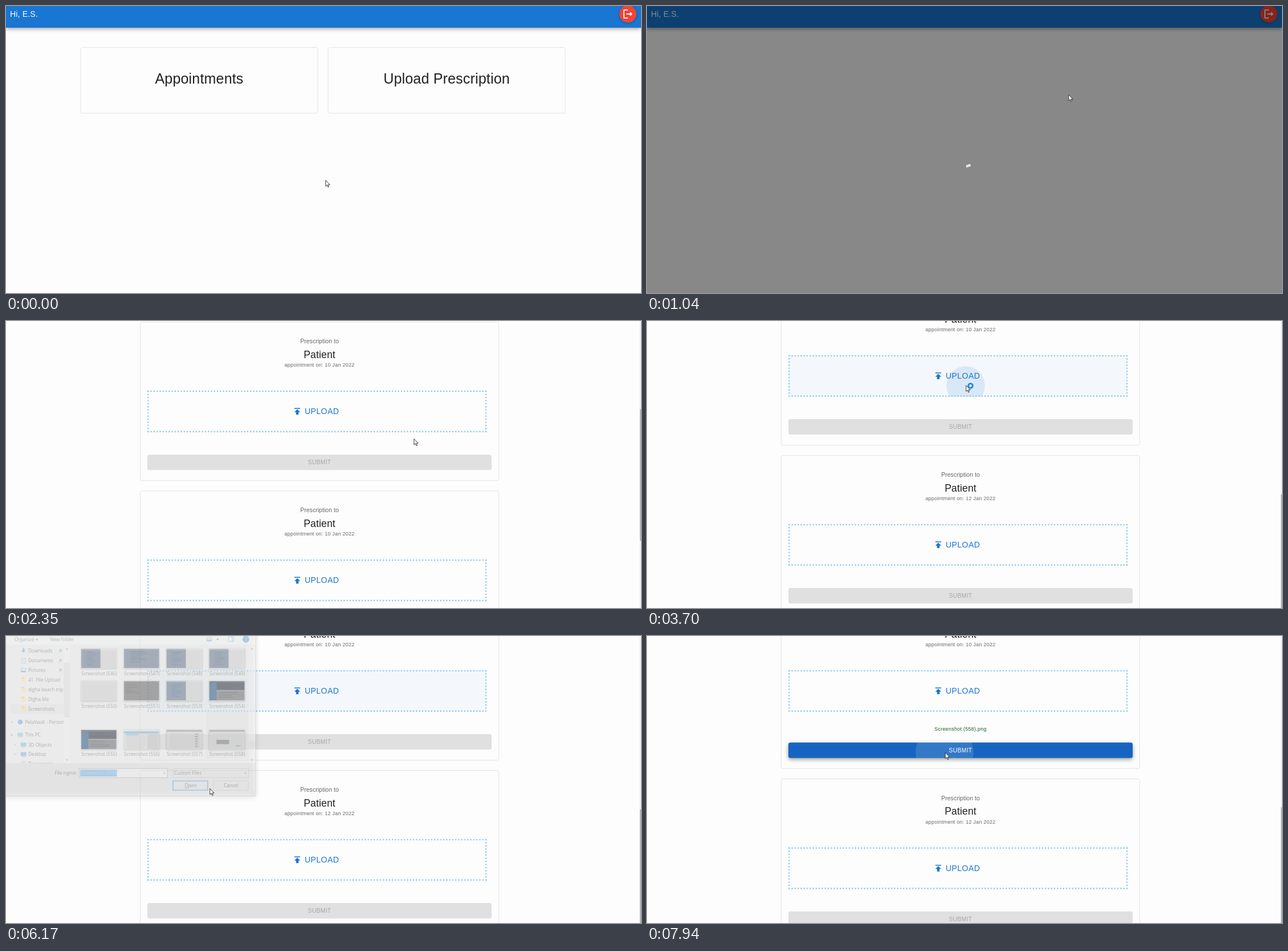
Recreate the animation shown at these times as an HTML page with a canvas. Size 1114 by 503 pixels, loop 8000 ms.

```html
<!DOCTYPE html>
<html lang="en">
<head>
<meta charset="utf-8">
<title>Prescription upload</title>
<style>
html, body { margin: 0; width: 100%; height: 100%; overflow: hidden; background: #fdfdfd; }
canvas { display: block; width: 1114px; height: 503px; }
</style>
</head>
<body>
<canvas id="stage" width="1114" height="503"></canvas>
<script>
const ctx = document.getElementById('stage').getContext('2d');
const W = 1114, H = 503, LOOP = 8000;
const WEB = '"Liberation Sans", Arial, sans-serif';
const UI = '"Open Sans", "Noto Sans", sans-serif';
const BLUE = '#1976d2', INK = '#212121', NAVY = '#0b2a55';
const LOGOUT = new Path2D('M17 8l-1.41 1.41L17.17 11H9v2h8.17l-1.58 1.58L17 16l4-4-4-4zM5 5h7V3H5c-1.1 0-2 .9-2 2v14c0 1.1.9 2 2 2h7v-2H5V5z');
const UPLOAD = new Path2D('M5 4v2h14V4H5zm0 10h4v6h6v-6h4l-7-7-7 7z');
const ARROW = new Path2D('M0 0V10.4L2.4 8.2L4.1 12L5.7 11.3L4.1 7.6H7.4Z');

// Scene times in ms
const LOAD = 890, LOADED = 1400, PRESS = 3600, RELEASE = 3700, DIALOG = 4870,
  PICK = 5080, CLOSE = 6060, ATTACH = 6400, SEND = 7825;

// Keys: time, x, y
const POINTER = [[70, 560, 305], [820, 739, 155], [1860, 739, 155], [2350, 715, 206],
  [2600, 703, 214], [2680, 703, 214], [3420, 559, 112.5], [3800, 559, 112.5], [4250, 558, 126],
  [4869, 558, 126], [4870, 379, 199], [5150, 379, 199], [5670, 357, 267], [6500, 357, 267],
  [6570, 360, 252], [7340, 522.5, 204]];
const SCROLL = [[1860, 0], [2350, 411], [2600, 616], [2680, 616], [2900, 770]];

const clamp = v => Math.min(1, Math.max(0, v));
const ramp = (t, start, length) => clamp((t - start) / length);

function track(keys, t, i = 1) {
  const n = keys.findIndex(k => k[0] > t);
  if (n === 0) return keys[0][i];
  if (n < 0) return keys[keys.length - 1][i];
  const a = keys[n - 1], b = keys[n];
  return a[i] + (b[i] - a[i]) * (t - a[0]) / (b[0] - a[0]);
}

function bezier(x1, x2) {
  return x => {
    let lo = 0, hi = 1, s = 0;
    for (let i = 0; i < 22; i++) {
      s = (lo + hi) / 2;
      const bx = 3 * (1 - s) ** 2 * s * x1 + 3 * (1 - s) * s * s * x2 + s ** 3;
      if (bx < x) lo = s; else hi = s;
    }
    return 3 * s * s - 2 * s ** 3;
  };
}
const ease = bezier(.4, .2), easeInOut = bezier(.42, .58);

function shade(color, blur, dy) {
  ctx.shadowColor = color;
  ctx.shadowBlur = blur;
  ctx.shadowOffsetY = dy;
}

function box(x, y, w, h, fill, stroke, r = 0, line = 1) {
  ctx.beginPath();
  ctx.roundRect(x, y, w, h, r);
  if (fill) { ctx.fillStyle = fill; ctx.fill(); }
  if (stroke) { ctx.strokeStyle = stroke; ctx.lineWidth = line; ctx.stroke(); }
}

function disc(x, y, r, fill) {
  ctx.beginPath();
  ctx.arc(x, y, r, 0, Math.PI * 2);
  ctx.fillStyle = fill;
  ctx.fill();
}

function poly(points, color, filled) {
  ctx.beginPath();
  points.forEach(p => ctx.lineTo(...p));
  ctx.lineWidth = 1;
  ctx.fillStyle = ctx.strokeStyle = color;
  if (filled) ctx.fill(); else ctx.stroke();
}

function text(str, x, y, size, color, { font = WEB, align = 'left', gap = 0 } = {}) {
  ctx.font = `${size}px ${font}`;
  ctx.letterSpacing = gap + 'px';
  ctx.textAlign = align;
  ctx.fillStyle = color;
  ctx.fillText(str, x, y);
}
const mid = (str, x, y, size, color, gap) => text(str, x, y, size, color, { align: 'center', gap });
const label = (str, x, y, size = 8.5, color = '#1a1a1a', align = 'left') =>
  text(str, x, y, size, color, { font: UI, align });

function icon(path, x, y, scale, color) {
  ctx.save();
  ctx.translate(x, y);
  ctx.scale(scale, scale);
  ctx.translate(-12, -12);
  ctx.fillStyle = color;
  ctx.fill(path);
  ctx.restore();
}

function clipped(x, y, w, h, draw) {
  ctx.save();
  ctx.beginPath();
  ctx.rect(x, y, w, h);
  ctx.clip();
  draw();
  ctx.restore();
}

function ripple(t, start, x, y, size, rgb, fade = 1) {
  if (t < start || fade <= 0) return;
  const e = ease(ramp(t, start, 550));
  disc(x, y, size * e, `rgba(${rgb},${(.1 + .2 * e) * fade})`);
}

function header(y) {
  ctx.save();
  shade('rgba(0,0,0,.4)', 7, 2);
  box(0, y - 20, W, 58, BLUE);
  ctx.restore();
  text('Hi, E.S.', 7, y + 19.4, 14.08, '#fff', { gap: .13 });
  ctx.save();
  shade('rgba(0,0,0,.25)', 4, 1);
  disc(1091, y + 14, 15, '#f44336');
  ctx.restore();
  icon(LOGOUT, 1091, y + 14, .88, '#fff');
}

function home(t) {
  ['Appointments', 'Upload Prescription'].forEach((name, i) => {
    const x = 131 + i * 434;
    ctx.save();
    if (i && t > 655) shade(`rgba(0,0,0,${.3 * ramp(t, 655, 165)})`, 10, 4);
    box(x, 72.5, 416, 115.5, '#fdfdfd', '#e4e4e4', 3.5);
    ctx.restore();
    mid(name, x + 208, 135.5, 25, INK, .184);
  });
}

function dotted(x0, y0, x1, y1) {
  const len = Math.hypot(x1 - x0, y1 - y0);
  ctx.save();
  ctx.lineCap = 'round';
  ctx.lineWidth = 2.7;
  ctx.strokeStyle = '#90caf9';
  ctx.setLineDash([0, len / Math.round(len / 5.3)]);
  ctx.beginPath();
  ctx.moveTo(x0, y0);
  ctx.lineTo(x1, y1);
  ctx.stroke();
  ctx.restore();
}

function submit(y, t, active) {
  const hover = ramp(t, 7220, 250);
  ctx.save();
  if (active) {
    shade('rgba(0,0,0,.4)', 4 + 3 * hover, 1.5 + hover);
    box(248, y, 604, 27, `rgb(${25 - 4 * hover},${118 - 17 * hover},${210 - 18 * hover})`, null, 3.5);
  } else box(248, y, 604, 27, '#e0e0e0', null, 3.5);
  ctx.restore();
  if (active) clipped(248, y, 604, 27, () => ripple(t, SEND, 522, 204, 331, '255,255,255'));
  mid('SUBMIT', 550, y + 16.8, 10.4, active ? '#fff' : '#a6a6a6', .26);
}

function card(y, date, t, current) {
  const attached = current && t >= ATTACH, extra = attached ? 14.7 : 0;
  box(235.5, y, 629, 278 + extra, null, '#e4e4e4', 3.5);
  mid('Prescription to', 550, y + 37.3, 10.5, '#666', .04);
  mid('Patient', 550, y + 62.8, 17.6, INK, .13);
  mid('appointment on: ' + date, 550, y + 78.6, 8.88, '#666', .296);
  if (current && !attached) {
    const hover = ramp(t, 3290, 130);
    box(248, y + 120, 595, 73, `rgba(25,118,210,${.04 * hover})`);
  }
  icon(UPLOAD, 511, y + 156.5, .733, BLUE);
  text('UPLOAD', 524, y + 161.4, 14.08, BLUE, { gap: .4 });
  if (current) clipped(248, y + 120, 595, 73, () =>
    ripple(t, PRESS, 559, 113, 312, '25,118,210', 1 - ramp(t, RELEASE, 550)));
  const top = y + 121.3, bottom = y + 192;
  dotted(249.3, top, 842, top);
  dotted(249.3, bottom, 842, bottom);
  dotted(249.3, top, 249.3, bottom);
  dotted(842, top, 842, bottom);
  if (attached) mid('Screenshot (558).png', 550, y + 226, 8.88, '#1b5e20', .296);
  submit(y + 232.4 + extra, t, attached);
}

function list(t) {
  const scroll = track(SCROLL, t), extra = t >= ATTACH ? 14.7 : 0;
  if (scroll < 60) header(-scroll);
  for (let i = 0; i < 4; i++) {
    const y = 117.7 + i * 296 + (i > 2 ? extra : 0) - scroll;
    if (y < H && y > -300) card(y, i > 2 ? '12 Jan 2022' : '10 Jan 2022', t, i === 2);
  }
  const ratio = 553 / (1323 + extra);
  box(1111.5, 0, 2.5, H, '#f1f1f1');
  box(1112, scroll * ratio - 18, 2, 553 * ratio, '#b4b4b4');
}

function backdrop(t) {
  const a = ease(ramp(t, LOAD, 225)) * (1 - ease(ramp(t, LOADED, 195)));
  if (a <= 0) return;
  box(0, 0, W, H, `rgba(0,0,0,${a / 2})`);
  const p = ((t - 920 + 1400) % 1400) / 1400, k = Math.PI * 2 / 127;
  const first = easeInOut(clamp(p * 2)), last = easeInOut(clamp(p * 2 - 1));
  const offset = 15 * first + 110 * last;
  const spin = p * Math.PI * 2 + .47;
  ctx.beginPath();
  ctx.arc(556, 258, 23.4, spin + offset * k, spin + Math.min(127, offset + 1 + 99 * first) * k);
  ctx.lineWidth = 4.2;
  ctx.strokeStyle = `rgba(255,255,255,${a * .85})`;
  ctx.stroke();
}

function chevron(x, y, dx, dy, color = '#555') {
  poly([[x - dx - dy, y - dy - dx], [x + dx, y + dy], [x - dx + dy, y - dy + dx]], color);
}
const caret = (x, y) => poly([[x - 2.5, y - 1], [x + 2.5, y - 1], [x, y + 2]], '#333', true);

function folder(x, y) {
  box(x - 4, y - 5, 5, 3, '#e8b64c');
  box(x - 4, y - 4, 8, 9, '#ffd978');
}

const pcIcon = color => (x, y) => {
  box(x - 5, y - 4, 10, 7, color);
  box(x - 3, y + 4, 6, 1, '#777');
};
function arrowDown(x, y) {
  box(x - 1.5, y - 5, 3, 5, '#2388e0');
  poly([[x - 4, y - 1], [x + 4, y - 1], [x, y + 4]], '#2388e0', true);
}
function sheet(x, y) {
  box(x - 3.5, y - 4.5, 7, 9, '#fff', '#7d8b99');
  for (let i = 0; i < 3; i++) box(x - 2, y - 2.5 + i * 2, 4, 1, '#4a90c8');
}
function photo(x, y) {
  box(x - 4.5, y - 3.5, 9, 7, '#c8e6fa', '#8796a3');
  box(x - 4, y + 1, 8, 2, '#3f7fb5');
}

// Name, indent, row centre, icon
const TREE = [['Downloads', 32, 23, arrowDown], ['Documents', 32, 41, sheet], ['Pictures', 32, 58.5, photo],
  ['41. File Upload', 32, 76, folder], ['digha beach trip', 32, 94, folder], ['Digha Me', 32, 111.5, folder],
  ['Screenshots', 32, 129, folder], ['PelaVault - Person', 26, 153, (x, y) => disc(x, y, 4.5, '#0a74d1')],
  ['This PC', 26, 176.5, pcIcon('#58a9d8')], ['3D Objects', 32, 194.5, pcIcon('#20a5bd')],
  ['Desktop', 32, 212, pcIcon('#1687d9')], ['Documents', 32, 229.5, sheet]];

function tree(faded) {
  box(0, 120, 97, 18, faded ? '#d9d9d9' : '#cde8ff');
  TREE.forEach(([name, x, y, draw], i) => {
    draw(x - 8.5, y);
    label(name, x, y + 3.1);
    if (i < 3) {
      poly([[87, y + 4], [90, y + 1]], '#777');
      poly([[88, y - 1], [92, y + 3], [94, y - 1], [91, y - 4]], '#8a8f94', true);
    }
    if (i === 8) chevron(2, y, 0, 1.5);
    else if (i > 6) chevron(i === 7 ? 2 : 8, y, 1.3, 0, '#888');
  });
}

const lines = (x, y, n, w, color) => {
  for (let i = 0; i < n; i++) box(x, y + i * 3.2, w * (.45 + .5 * Math.abs(Math.sin(i * 2.3 + x))), .7, color);
};
const THUMBS = {
  split(x, y) {
    box(x, y, 35, 35, NAVY);
    box(x, y, 64, 2, '#d5dde6');
    lines(x + 9, y + 6, 8, 20, '#4c739e');
    lines(x + 38, y + 7, 5, 19, '#d0d0d0');
  },
  navy(x, y) {
    box(x, y, 64, 35, NAVY);
    lines(x + 12, y + 5, 7, 30, '#31598a');
    box(x + 38, y + 18, 10, 1, '#c69254');
  },
  blank(x, y) { lines(x + 8, y + 6, 7, 10, '#e3e3e3'); },
  black(x, y) {
    box(x, y, 64, 35, '#0c0c0c');
    lines(x + 3, y + 5, 6, 25, '#54705a');
  },
  editor(x, y) {
    box(x, y, 64, 35, '#14181f');
    box(x, y, 64, 3, '#40536e');
    box(x, y + 3, 13, 32, '#1877c9');
    box(x + 13, y + 3, 51, 13, '#28334a');
    lines(x + 16, y + 5, 4, 40, '#8b7566');
    box(x + 13, y + 17, 51, 1.2, '#e5e5e5');
    lines(x + 16, y + 20, 4, 40, '#4d4d4d');
  },
  page(x, y) {
    box(x, y + 3, 64, 3, '#2394df');
    box(x + 3, y + 7, 24, 3, '#55b0e8');
    lines(x + 5, y + 12, 6, 45, '#b9c3cc');
    box(x + 24, y + 31, 8, 2, '#e8c13c');
  },
  rows(x, y) {
    box(x, y, 64, 3, '#4b4f55');
    for (let i = 0; i < 6; i++) {
      box(x + 5, y + 7 + i * 4.5, 26, 1, '#c4c4c4');
      box(x + 52, y + 6.5 + i * 4.5, 5, 2, '#555');
    }
  },
  popup(x, y) {
    box(x, y, 64, 3, '#4b4f55');
    lines(x + 5, y + 8, 8, 50, '#d6d6d6');
    box(x + 13, y + 18, 23, 8, '#3a3d42');
    box(x + 48, y + 28, 8, 2, '#2b86d9');
  }
};
const FILES = [[546, 'split'], [547, 'navy'], [548, 'split'], [549, 'split'], [550, 'blank'], [551, 'black'],
  [553, 'split'], [554, 'editor'], [555, 'editor'], [556, 'page'], [557, 'rows'], [558, 'popup']];

function files(picked, faded) {
  box(357, 134, 77, 86, faded ? '#d9d9d9' : picked ? '#cce8ff' : '#e5f3ff');
  FILES.forEach(([number, kind], i) => {
    const x = 128.5 + (i % 4) * 78, y = [18.5, 77.5, 166.5][i >> 2];
    ctx.save();
    shade('rgba(0,0,0,.45)', 3, 1);
    box(x, y, 65, 37, '#fff', '#c8c8c8', 0, .7);
    ctx.restore();
    THUMBS[kind](x + .5, y + 1);
    label(`Screenshot (${number})`, x + 33, [68, 127.7, 215.2][i >> 2], 8.4, '#1a1a1a', 'center');
  });
}

function button(name, x, primary) {
  box(x, 260.5, 63.5, 17, '#e1e1e1', primary ? '#0078d7' : '#adadad', 0, primary ? 1.7 : 1);
  label(name, x + 32, 272, 8.5, '#111', 'center');
  if (primary) box(x + 21, 273.2, 6.5, .7, '#222');
}

function dialog(t) {
  const picked = t >= PICK, close = ramp(t, CLOSE, 180), faded = close > 0;
  ctx.save();
  ctx.globalAlpha = 1 - close * 1.18 > 0 ? 1 - close * 1.18 : 0;
  const s = 1 - .064 * close;
  ctx.translate(207, 95);
  ctx.scale(s, s);
  ctx.translate(-207, -95);
  ctx.save();
  shade('rgba(0,0,0,.45)', 9, 2);
  box(-40, -200, 487.5, 488, '#f0f0f0', '#9a9a9a');
  ctx.restore();
  box(-40, -200, 487, 428, '#fff');
  box(-40, -20, 487, 32.5, '#f5f6f7');
  box(-40, 12.5, 487, .8, '#e3e4e6');
  label('Organize', 7, 5.8, 8.5, '#1e395b');
  caret(48, 2.5);
  label('New folder', 72, 5.8, 8.5, '#1e395b');
  photo(362.5, 2);
  caret(378, 2);
  box(398, -2, 9, 8, '#fff', '#3b86c6');
  box(403, -2, 4, 8, '#9ccbee');
  disc(429.5, 2, 6.2, '#0a63b8');
  label('?', 429.5, 5.3, 9, '#fff', 'center');

  clipped(-40, 14, 137, 214, () => tree(faded));
  box(97, 14, 11.5, 214, '#f0f0f0');
  box(97.5, 45, 10.5, 100, '#cdcdcd');
  chevron(103, 20, 0, -1.5);
  chevron(103, 222, 0, 1.5);
  clipped(109, 14, 325, 214, () => files(picked, faded));
  box(435, 14, 11.5, 214, '#f0f0f0');
  box(435, 188, 11, 13, '#cdcdcd');
  chevron(440.5, 20, 0, -1.5);
  chevron(440.5, 222, 0, 1.5);

  label('File name:', 121, 249.2, 8.5, '#111', 'right');
  box(102, 250.4, 5, .7, '#222');
  box(125, 238, 161.5, 16.5, '#fff', '#7a7a7a');
  chevron(281, 246, 0, 1.3);
  if (picked) {
    if (faded) box(127, 240, 67, 12.5, '#0078d7');
    label('Screenshot (558)', 128, 249.2, 8.4, faded ? '#fff' : '#111');
  }
  box(296.5, 238, 138, 16.5, '#e1e1e1', '#adadad');
  label('Custom Files', 298.5, 249.2);
  chevron(429, 246, 0, 1.3);
  button('Open', 296.5, true);
  button('Cancel', 370.5, false);
  for (let i = 0; i < 3; i++)
    for (let j = 0; j <= i; j++) box(444 - j * 2.5, 280 + i * 2.5, 1.3, 1.3, '#a8a8a8');
  ctx.restore();

  if (t < PICK) {
    ctx.save();
    shade('rgba(0,0,0,.45)', 4, 2);
    box(379.5, 210, 104, 38, '#fff', '#767676');
    ctx.restore();
    ['Item type: PNG File', 'Dimensions: 1920 x 1080', 'Size: 295 KB'].forEach((line, i) =>
      label(line, 382.5, 220.3 + i * 11.8, 8.35, '#575757'));
  }
}

function pointer(t) {
  const x = track(POINTER, t), y = track(POINTER, t, 2);
  ctx.save();
  ctx.translate(x + .8, y + .5);
  ctx.fillStyle = '#fff';
  ctx.strokeStyle = '#26262c';
  ctx.lineWidth = .9;
  ctx.fill(ARROW);
  ctx.stroke(ARROW);
  ctx.restore();
  if (t > 3640 && t < 4450) {
    disc(x + 8.5, y + 1, 5.2, '#1f86e8');
    disc(x + 8.5, y + 1, 2.4, '#d9ecfb');
  }
}

function draw(t) {
  box(0, 0, W, H, '#fdfdfd');
  if (t < LOADED) {
    header(0);
    if (t < LOAD) home(t);
  } else list(t);
  backdrop(t);
  if (t >= DIALOG && t < CLOSE + 180) dialog(t);
  pointer(t);
}

const begin = performance.now();
function frame() {
  draw((performance.now() - begin) % LOOP);
  requestAnimationFrame(frame);
}
frame();
</script>
</body>
</html>
```
